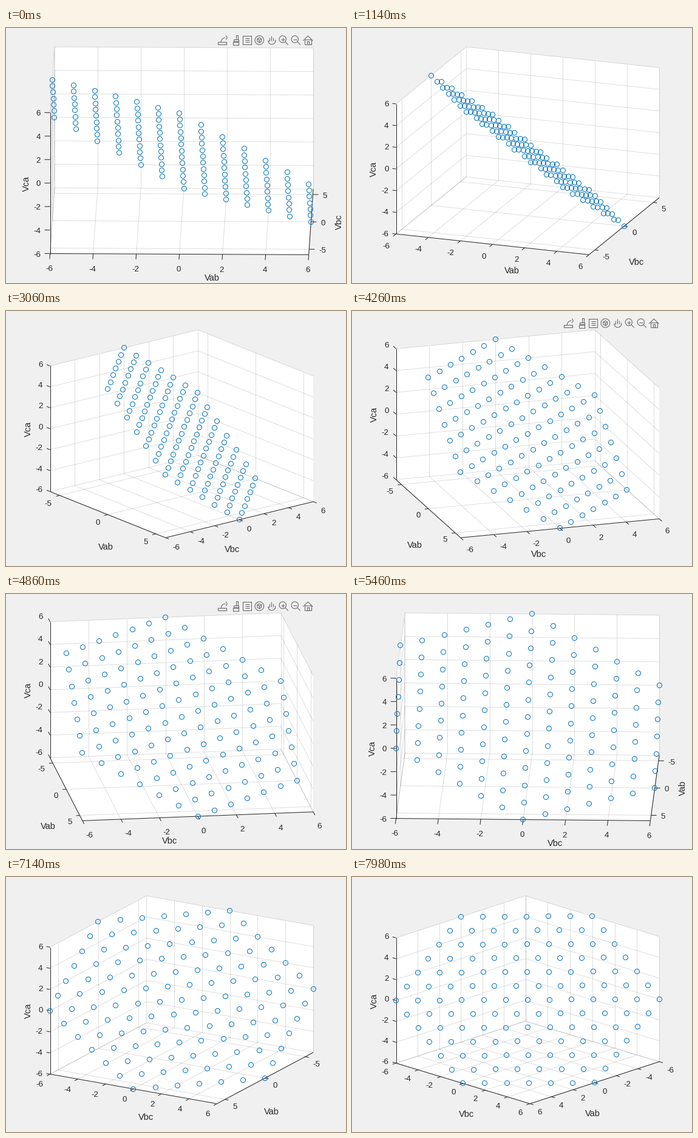
A matplotlib script that plays this animation: 560 px wide and 420 px high, repeating every 8 s.

```python
import numpy as np
import matplotlib.pyplot as plt
from matplotlib.animation import FuncAnimation
from matplotlib.collections import LineCollection
from matplotlib.patches import Polygon

W, H = 560, 420
LEFT, TOP, BOX_W, BOX_H = 72.55, 31.1, 433.5, 342.3
LIM = 6
ELEV = np.radians(25)
INK = "#262626"
BLUE = "#0072BD"
PT = 0.72                       # points per pixel at 100 dpi
TICK_PX, LABEL_PX = 13.33, 14.67
NAMES = ["Vab", "Vbc", "Vca"]
STEP_MS, TICK_MS, LOOP_MS = 60, 20, 8000

plt.rcParams["font.family"] = "Liberation Sans"
fig = plt.figure(figsize=(W / 100, H / 100), dpi=100, facecolor="#f0f0f0")
ax = fig.add_axes([0, 0, 1, 1])
ax.set_xlim(0, W)
ax.set_ylim(H, 0)
ax.axis("off")

# line voltages: vab + vbc + vca = 0, each within the limits
span = range(-LIM, LIM + 1)
volts = np.array([(a, b, -a - b) for a in span for b in span
                  if abs(a + b) <= LIM], float)

walls = Polygon([(0, 0)] * 3, closed=True, fc="white", ec="none", zorder=1)
ax.add_patch(walls)
grid = LineCollection([], colors=INK, alpha=0.15, linewidths=PT, zorder=2)
rulers = LineCollection([], colors=INK, linewidths=PT, zorder=3)
ax.add_collection(grid)
ax.add_collection(rulers)
dots = ax.scatter(volts[:, 0], volts[:, 1], s=(8 * PT) ** 2, zorder=4,
                  facecolors="none", edgecolors=BLUE, linewidths=PT,
                  clip_on=False)


def make_text(px):
    return ax.text(0, 0, "", fontsize=px * PT, color=INK, ha="center",
                   va="baseline", rotation_mode="anchor", zorder=5)


tick_texts = [make_text(TICK_PX) for _ in range(21)]
name_texts = [make_text(LABEL_PX) for _ in NAMES]


def place(text, string, x, y, px, rotated=False):
    """Centre the capitals of a text on (x, y)."""
    half = 0.36 * px
    text.set_text(string)
    text.set_rotation(90 if rotated else 0)
    text.set_position((x + half, y) if rotated else (x, y + half))
    text.set_visible(True)


def half_width(string):
    return 3.7 + (2.2 if string.startswith("-") else 0)


# ---- toolbar: each icon is a list of polylines around its centre ----------

def ring(x, y, r, start=0, stop=360, sides=24):
    t = np.radians(np.linspace(start, stop, sides + 1))
    return np.column_stack([x + r * np.cos(t), y + r * np.sin(t)])


def rect(x, y, w, h):
    return ring(0, 0, np.sqrt(2), 45, 405, 4) * (w / 2, h / 2) + (x, y)


def row(y, w):
    return [(-w / 2, y), (w / 2, y)]


def lens():
    return [ring(-1.5, -1.5, 5.7), [(2.7, 2.7), (7.5, 7.5)],
            np.add(row(0, 6), -1.5)]


share = [rect(-1, 5, 14, 4), ring(4, 3, 7, 180, 270),
         ring(3, -4, 4, -60, 60, 2)]
brush = [rect(3, -5, 3, 7), rect(2, 0, 8, 3), rect(1, 5, 9, 5)]
tips = [rect(0, 0, 14, 14)] + [row(y, 7) for y in (-3, 0, 3)]
orbit = [ring(0, 0, 7.3), ring(0, 0, 4, 30, 390, 6)]
orbit += [[(0, 0), tip] for tip in ring(0, 0, 4, 90, 450, 3)]
hand = [ring(0.5, 1, 6, 0, 180)]
hand += [[(x, 1), (x, abs(x) - 7.5)] for x in (-3, 0, 3, 6)]
hand += [[(-5.5, 1), (-3, 2)]]
plus = lens() + [[(-1.5, -4.5), (-1.5, 1.5)]]
house = [ring(0, 1, 8, 180, 360, 2), rect(0, 3, 11, 8), rect(0, 4.5, 3, 5)]

icons = [share, brush, tips, orbit, hand, plus, lens(), house]
toolbar = LineCollection([np.add(part, (357.3 + 20 * i, 20))
                          for i, parts in enumerate(icons) for part in parts],
                         colors="#6a6a6a", linewidths=1.1 * PT, zorder=6)
ax.add_collection(toolbar)


# ---- view ----------------------------------------------------------------

def projector(az):
    """Parallel view of the cube, stretched to fill the plot box."""
    c, s = np.cos(az), np.sin(az)
    spread = abs(c) + abs(s)
    height = np.cos(ELEV) + np.sin(ELEV) * spread

    def project(p):
        x, y, z = np.asarray(p, float).T / (2 * LIM)
        u = (x * c + y * s) / spread
        v = (z * np.cos(ELEV) + (y * c - x * s) * np.sin(ELEV)) / height
        return np.stack([LEFT + BOX_W * (u + 0.5),
                         TOP + BOX_H * (0.5 - v)], axis=-1)
    return project


def unit(v):
    return v / np.hypot(*v)


def ticks_for(length):
    return range(-6, 7, 2) if length > 215 else range(-5, 6, 5)


def name_offset(theta):
    """Distance of an axis name from the middle of its axis."""
    return np.array([90 * np.exp(-2.7 * theta) - 35,
                     38 + 46 * theta - 24 * theta ** 2])


def draw(n):
    k = n * TICK_MS // STEP_MS
    az = np.radians(1 + k)
    project = projector(az)
    if np.cos(az) > 1e-9:
        dims = (0, 1)
        corners = [(-1, -1), (1, -1), (1, 1), (-1, 1)]
    else:
        dims = (1, 0)
        corners = [(1, -1), (1, 1), (-1, 1), (-1, -1)]
    base = [np.array([x, y, -1.0]) * LIM for x, y in corners]
    roof = [b * (1, 1, -1) for b in base]
    left, front, right, far = base
    pl, pf, pr = project([left, front, right])

    walls.set_xy(project([left, front, right, roof[2], roof[3], roof[0]]))
    dots.set_offsets(np.floor(project(volts)) + 0.5)

    slopes = [np.arctan2(pf[1] - pl[1], pf[0] - pl[0]),
              np.arctan2(pf[1] - pr[1], pr[0] - pf[0])]
    steep = max(slopes) > 1.3
    tick_len = 9 if steep else 6
    pool = iter(tick_texts)
    for text in tick_texts:
        text.set_visible(False)
    grid_lines, ruler_lines = [], [(pl, pf), (pf, pr)]

    # the two floor axes
    for i, dim in enumerate(dims):
        end, other = ((pl, pr), (pr, pl))[i]
        side = (-1, 1)[i]
        out = unit(pf - other)
        upright = slopes[i] > 1.3
        for t in ticks_for(np.hypot(*(pf - end))):
            near, back, top = front.copy(), far.copy(), roof[3].copy()
            near[dim] = back[dim] = top[dim] = t
            p, b, q = project([near, back, top])
            grid_lines += [(p, b), (b, q)]
            ruler_lines.append((p, p + out * tick_len))
            label = str(t)
            if upright:
                off = (side * (16 + half_width(label)), 1)
            elif steep:
                off = (out[0] * 16, out[1] * 24)
            else:
                off = (out[0] * 13 + side * half_width(label),
                       8.5 + 16 * out[1])
            place(next(pool), label, *(p + off), TICK_PX)
        mid = (pf + end) / 2
        if upright:
            x, y = min(mid[0] + side * 45, 548), mid[1]
        else:
            x, y = mid + name_offset(slopes[i]) * (-side, 1)
        place(name_texts[dim], NAMES[dim], x, y, LABEL_PX, upright)

    # the vertical axis
    out = unit(pf - pr) if slopes[0] > 1.3 else unit(pl - pf)
    for t in range(-LIM, LIM + 1, 2):
        p, b, q = project([(c[0], c[1], t) for c in (left, far, right)])
        grid_lines += [(p, b), (b, q)]
        ruler_lines.append((p, p + out * tick_len))
        label = str(t)
        gap = 15.5 if steep else 12
        place(next(pool), label, p[0] - gap - half_width(label),
              p[1] + 11 * out[1] + 0.3, TICK_PX)
    lo, hi = project([left, roof[0]])
    ruler_lines.append((lo, hi))
    x = 35.5 - 3.5 * np.exp(-20 * slopes[0])
    place(name_texts[2], NAMES[2], x, (lo[1] + hi[1]) / 2 + 0.5, LABEL_PX,
          True)

    grid.set_segments(grid_lines)
    rulers.set_segments(ruler_lines)
    toolbar.set_visible(k < 7 or 71 <= k < 88)
    return []


anim = FuncAnimation(fig, draw, frames=LOOP_MS // TICK_MS, interval=TICK_MS,
                     init_func=lambda: draw(0), repeat=True, repeat_delay=0)
plt.show()
```
